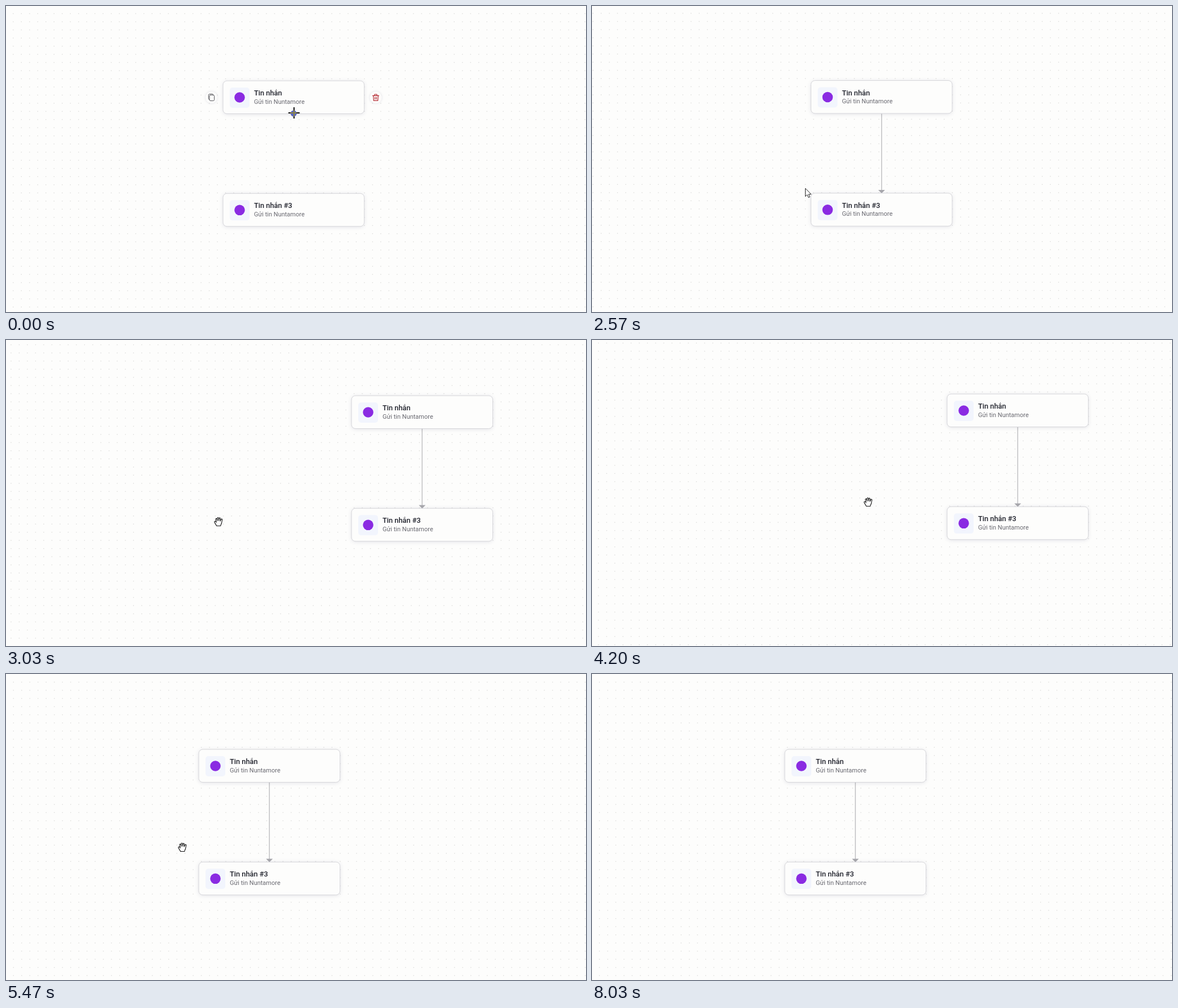
Animation, 1029 px wide and 544 px high, one loop 8060 ms. Source, as an HTML page with a canvas:

```html
<!DOCTYPE html>
<html lang="vi">
<head>
<meta charset="utf-8">
<title>Flow editor</title>
<style>
  html, body { margin: 0; width: 100%; height: 100%; overflow: hidden; background: #fdfdfc; }
  canvas { display: block; }
</style>
</head>
<body>
<canvas id="stage" width="1029" height="544"></canvas>
<script>
const W = 1029, H = 544, LOOP = 8060, GAP = 14.49, STEP = 100 / 3;
const ctx = document.getElementById('stage').getContext('2d');

const smooth = u => u * u * (3 - 2 * u);
const easeIn = u => u * u;
const easeOut = u => u * (2 - u);

// Keys are [time, x, y, easing into this key].
const CAMERA = [
  [0, 385, 133], [2500, 385, 133], [2570, 388.5, 132.5, easeIn], [2820, 613, 99],
  [3040, 613, 99], [3330, 630, 96], [4360, 630, 96], [4670, 591, 104.5, easeIn], [5150, 342, 134, easeOut]
];
const POINTER = [
  [0, 511, 190], [300, 511, 190], [1150, 511, 333], [1500, 511, 333], [2350, 375, 325],
  [2500, 375, 325], [2570, 378.5, 324.5, easeIn], [2820, 603, 291], [3000, 377, 323],
  [3040, 377, 323], [3330, 394, 320], [3500, 394, 320], [4100, 490, 288],
  [4360, 490, 288], [4670, 451, 298, easeIn], [5150, 202, 327, easeOut], [5440, 313, 308]
];
const CONNECTED = 1250, POINTER_GONE = 5870;

function at(keys, t) {
  const i = keys.findIndex(k => k[0] > t);
  if (i < 0) return keys[keys.length - 1].slice(1, 3);
  const a = keys[i - 1], b = keys[i];
  const u = (b[3] || smooth)((t - a[0]) / (b[0] - a[0]));
  return [a[1] + (b[1] - a[1]) * u, a[2] + (b[2] - a[2]) * u];
}

function clock() {
  const step = Math.floor((performance.now() % LOOP + 4) / STEP);
  return Math.round(step * STEP / 10) * 10;
}

const mod = (v, n) => ((v % n) + n) % n;

function circle(x, y, r, fill) {
  ctx.beginPath();
  ctx.arc(x, y, r, 0, 7);
  ctx.fillStyle = fill;
  ctx.fill();
}

function box(x, y, w, h, r, fill) {
  ctx.beginPath();
  ctx.roundRect(x, y, w, h, r);
  ctx.fillStyle = fill;
  ctx.fill();
}

function shadow(color, blur, dy) {
  ctx.shadowColor = color;
  ctx.shadowBlur = blur;
  ctx.shadowOffsetY = dy;
}

function text(str, x, y, font, color) {
  ctx.font = font + ' Roboto, sans-serif';
  ctx.fillStyle = color;
  ctx.fillText(str, x, y);
}

function shape(d, x, y, stroke, width, fill) {
  ctx.save();
  ctx.translate(x, y);
  const path = new Path2D(d);
  ctx.lineJoin = ctx.lineCap = 'round';
  ctx.strokeStyle = stroke;
  ctx.lineWidth = width;
  if (fill) { ctx.fillStyle = fill; ctx.fill(path); }
  ctx.stroke(path);
  ctx.restore();
}

function grid(x, y) {
  ctx.fillStyle = '#dcdcda';
  for (let gx = mod(x - 372.7, GAP); gx < W; gx += GAP)
    for (let gy = mod(y - 120, GAP); gy < H; gy += GAP)
      ctx.fillRect(gx - .2, gy - .2, 1.4, 1.4);
}

function card(x, y, title) {
  ctx.save();
  shadow('rgba(80,80,120,.16)', 7, 1);
  box(x, y, 250.5, 58.5, 7, '#fdfdfc');
  ctx.restore();
  ctx.strokeStyle = '#d6d6da';
  ctx.lineWidth = 1;
  ctx.stroke();
  box(x + 12, y + 12, 35, 36, 5, '#f2f5fd');
  circle(x + 29.5, y + 29.5, 9.3, '#8a2be2');
  text(title, x + 55, y + 26, '500 12.8px', '#20222c');
  text('Gửi tin Nuntamore', x + 55, y + 40.5, '400 11px', '#686870');
}

function toolButton(x, y) {
  ctx.save();
  shadow('rgba(90,90,130,.18)', 4, 0);
  circle(x, y, 10.5, '#fdfdfc');
  ctx.restore();
}

function tools(x, y) {
  const left = x - 20.5, right = x + 271, cy = y + 29.5;
  toolButton(left, cy);
  shape('M-2 -4.2H3A2 2 0 0 1 5 -2.2V4A2 2 0 0 1 3 6H-1.5A2 2 0 0 1 -3.5 4V-2.5A1.7 1.7 0 0 1 -2 -4.2M-3.5 4A2 2 0 0 1 -5.2 2V-4A2 2 0 0 1 -3.2 -6H1.5A2 2 0 0 1 3.3 -4.3',
    left, cy, '#55555a', 1);
  toolButton(right, cy);
  shape('M-5.5 -3.2H5.5M-2 -3.2V-5.5H2V-3.2M-4.3 -3L-3.7 5.6H3.7L4.3 -3M-1.3 -.5V3M1.3 -.5V3',
    right, cy, '#b3262e', 1.2);
}

function wire(x, top, bottom) {
  ctx.fillStyle = '#c0c0c3';
  ctx.fillRect(x - .75, top, 1.5, bottom - top);
}

function edge(x, y) {
  wire(x, y + 59, y + 195);
  ctx.beginPath();
  ctx.moveTo(x - 6, y + 194.5);
  ctx.lineTo(x + 6, y + 194.5);
  ctx.lineTo(x, y + 200.5);
  ctx.fillStyle = '#a8a8ad';
  ctx.fill();
}

function crosshair(x, y, overHandle) {
  const bars = () => {
    ctx.fillRect(x - 10, y - 1, 20, 2);
    ctx.fillRect(x - 1, y - 10, 2, 20);
  };
  ctx.fillStyle = '#111';
  bars();
  if (!overHandle) return;
  ctx.save();
  ctx.beginPath();
  ctx.arc(x - 1, y + 1, 5.5, 0, 7);
  ctx.clip();
  ctx.fillStyle = '#8f8540';
  bars();
  ctx.restore();
}

const ARROW = 'M0 0V14L3.3 11L5.6 16L8 15L5.8 10.2H10Z';
const OPEN_HAND = 'M-3.5 7.5C-4 5 -7.5 2 -7.2 0C-6.8 -1.4 -5 -.8 -3.8 1.3L-5 -4C-5.2 -6 -3.2 -6.2 -2.8 -4.6L-2 -1.5L-2.2 -6C-2 -8 0 -8 .2 -6L.5 -1.8L1.2 -6C1.6 -7.6 3.4 -7.2 3.3 -5.6L3.1 -1L4.6 -4C5.4 -5.6 7.2 -4.8 6.6 -3C5.6 0 6.2 3 4.2 5.2L3.8 7.5Z';
const CLOSED_HAND = 'M-3.5 6C-4 4 -6 2.5 -5.6 .5C-5 -.6 -4 -.3 -3.6 0L-4.2 -2.5C-4 -4.6 -2 -4.6 -1.6 -3.4C-1.4 -5.2 .8 -5.2 1 -3.6C1.4 -5 3.2 -4.8 3.4 -3C4.4 -4.2 5.8 -3 5.6 -1.5C5.6 1 5.8 3 4.2 4.5L3.8 6Z';

function pointer(t, x, y) {
  if (t >= POINTER_GONE) return;
  if (t < 1500) return crosshair(x, y, t <= 300);
  if (t < 2600) return shape(ARROW, x, y, '#222', 1, '#fff');
  const grabbing = t < 2820 || (t > 3060 && t < 3330) || (t > 4380 && t < 5150);
  shape(grabbing ? CLOSED_HAND : OPEN_HAND, x, y, '#111', 1.1, '#fff');
}

function draw() {
  const t = clock();
  const [x, y] = at(CAMERA, t), [px, py] = at(POINTER, t);
  const mid = x + 125.3;
  ctx.fillStyle = '#fdfdfc';
  ctx.fillRect(0, 0, W, H);
  grid(x, y);
  if (t >= CONNECTED) edge(mid, y);
  card(x, y, 'Tin nhắn');
  card(x, y + 200.3, 'Tin nhắn #3');
  if (t < CONNECTED) {
    if (py > 192) wire(mid, y + 58, py);
    if (py < 200) tools(x, y);
    circle(mid, y + 58, 5.5, '#5967c0');
  }
  pointer(t, px, py);
  requestAnimationFrame(draw);
}
draw();
</script>
</body>
</html>
```
